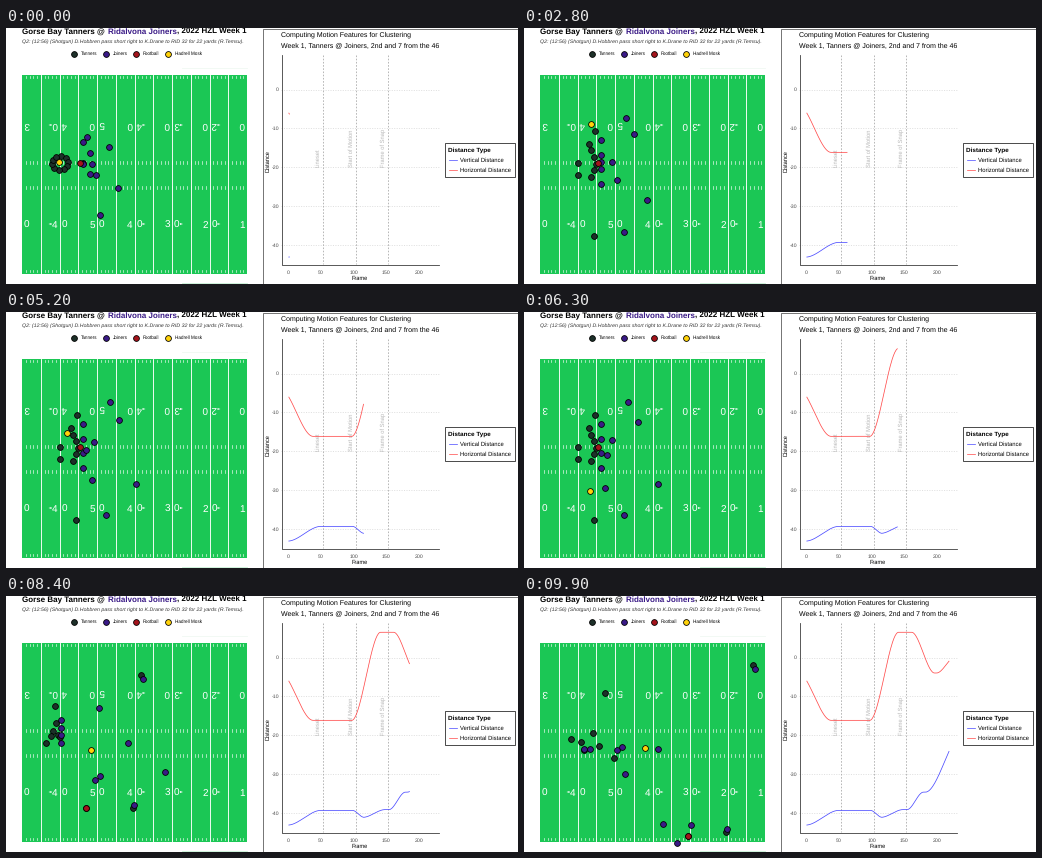
Write a matplotlib script that moves like this. It is 512x256 px and loops after 10000 ms.

```python
import matplotlib.pyplot as plt
import numpy as np
from matplotlib.animation import FuncAnimation
from matplotlib.patches import Polygon, Rectangle

W, H, DPI = 512, 256, 64
FRAMES, INTERVAL = 100, 100
PX = 72 / DPI  # points per pixel

GREEN, DARK, PURPLE = "#1bc755", "#1d3029", "#3a1a86"
BROWN, GOLD = "#a3141c", "#ffd20a"
BLUE, RED = "#4a4aff", "#ff4a4a"

plt.rcParams.update({
    "font.family": "Liberation Sans",
    "text.hinting": "none",
    "toolbar": "None",
})
fig = plt.figure(figsize=(W / DPI, H / DPI), dpi=DPI, facecolor="white")
ax = fig.add_axes([0, 0, 1, 1])
ax.set(xlim=(0, W), ylim=(H, 0))
ax.axis("off")


def text(x, y, s, size, color="black", ha="left", va="baseline", **kw):
    return ax.text(x, y, s, fontsize=size * PX, color=color, ha=ha, va=va, **kw)


def line(x, y, color="black", width=1.0, **kw):
    return ax.plot(x, y, color=color, lw=width * PX, **kw)[0]


def box(x, y, w, h, color):
    ax.add_patch(Rectangle((x, y), w, h, fc="white", ec=color, lw=0.8 * PX))


def dots(x, y, color, z=5):
    return ax.plot(x, y, "o", ms=5.8 * PX, mfc=color, mec="black",
                   mew=0.8 * PX, zorder=z)[0]


# ---- field ----
LEFT, RIGHT, TOP, BOTTOM = 16, 241, 47, 245.5
TEN = 37.5

text(16, 6.2, "Gorse Bay Tanners @", 8.03, weight="bold")
text(101.8, 6.2, "Ridalvona Joiners", 8.03, PURPLE, weight="bold")
text(171, 6.2, ", 2022 HZL Week 1", 8.03, weight="bold")
text(16, 15.2, "Q2: (12:56) (Shotgun) D.Hobbren pass short right to K.Drane "
     "to RID 32 for 22 yards (R.Temsu).", 5.3, "#333333", style="italic")

for x, label, color in ((67.5, "Tanners", DARK), (99.5, "Joiners", PURPLE),
                        (129.5, "Football", BROWN), (161.5, "Hadrell Mosk", GOLD)):
    dots([x], [25.5], color)
    text(x + 7.4, 27.2, label, 4.65)

field = Rectangle((LEFT, TOP), RIGHT - LEFT, BOTTOM - TOP, fc=GREEN, lw=0)
ax.add_patch(field)
for k in range(1, 12):
    line([LEFT + k * TEN / 2] * 2, [TOP, BOTTOM], "white", 0.9)
for k in range(1, 60):
    x = LEFT + k * TEN / 10
    for y in (48, 133.3, 158.3, 242):
        line([x, x], [y, y + 2.2], "white", 0.7, alpha=0.85)

for k in range(7):
    x, tens = LEFT + k * TEN, str(5 - abs(k - 2))
    for y, up, turn, pair in ((97, -1, 180, "0" + tens), (196, 1, 0, tens + "0")):
        for dx, digit in zip((-4.7, 4.7), pair):
            if LEFT < x + dx < RIGHT:
                text(x + dx, y + 3.5 * up, digit, 10, "white", "center",
                     rotation=turn, rotation_mode="anchor")
        if k != 2 and 0 < k < 6:
            side = np.sign(k - 2)
            tip = x + 11 * side
            ax.add_patch(Polygon([(tip - 3 * side, y - 1), (tip - 3 * side, y + 1),
                                  (tip, y)], fc="white", lw=0))
line([176, 241], [39.5, 39.5], "#eff8f2", 0.8)
line([176, 241], [254.5, 254.5], "#c4efd2", 0.8)


# ---- chart ----
def fx(f):
    return 282.2 + 0.655 * np.asarray(f, float)


def vy(v):
    return 61.5 - 3.88 * np.asarray(v, float)


box(256.5, 0.5, 255, 255, "#555555")
text(275, 8.3, "Computing Motion Features for Clustering", 7.06)
text(275, 20.3, "Week 1, Tanners @ Joiners, 2nd and 7 from the 46", 6.96)

for v in range(0, -50, -10):
    line([275, 432.5], [vy(v)] * 2, "#d4d4d4", 0.7, ls=(0, (1.5, 2)))
    text(273, vy(v) + 1.8, str(v), 5.2, "#4d4d4d", "right")
for f in range(0, 250, 50):
    text(fx(f), 245.6, str(f), 5.2, "#4d4d4d", "center")
for f, label in ((53, "Lineset"), (104, "Start of Motion"), (152, "Frame of Snap")):
    line([fx(f)] * 2, [27, 236], "#a6a6a6", 0.8, ls=(0, (2, 2)))
    text(fx(f) - 2, 139, label, 5.8, "#b8b8b8", "right", "bottom", rotation=90)
line([275.5, 275.5, 432.5], [27, 236.5, 236.5], "#333333", 0.8)
text(354, 251.6, "Frame", 5.6, ha="center")
text(261.8, 133, "Distance", 5.6, ha="center", va="center", rotation=90)

box(438.5, 114.5, 70, 34, "#222222")
text(442.5, 123.6, "Distance Type", 6.4, weight="bold")
for y, color, label in ((132, BLUE, "Vertical Distance"),
                        (142, RED, "Horizontal Distance")):
    line([443, 450.5], [y, y], color, 0.7)
    text(454.5, y + 2, label, 5.85)


# ---- motion ----
STEPS = np.arange(FRAMES)
SNAP, CATCH, LAST = 69, 84, FRAMES - 1


def ease(x, a, b):
    u = np.clip((np.asarray(x, float) - a) / (b - a), 0, 1)
    return u * u * (3 - 2 * u)


def cross(f):
    return (-3.8 - 12.4 * ease(f, -13, 38) + 22.7 * ease(f, 97, 141)
            - 10.5 * ease(f, 161, 196) + 4.2 * ease(f, 199, 228))


def depth(f):
    return (-43.2 + 3.8 * ease(f, -1, 50) - 1.8 * ease(f, 98, 116)
            + 2 * ease(f, 114, 148) + 4.5 * ease(f, 154, 179)
            + 15.5 * ease(f, 182, 240))


def path(times, points):
    """Monotone cubic through points, sampled at every step."""
    t, p = np.array(times, float), np.array(points, float)
    h = np.diff(t)[:, None]
    d = np.diff(p, axis=0) / h
    same = d[:-1] * d[1:] > 0
    inner = np.where(same, 2 * d[:-1] * d[1:] / np.where(same, d[:-1] + d[1:], 1), 0)
    m = np.vstack([d[:1], inner, d[-1:]])
    i = np.clip(np.searchsorted(t, STEPS, side="right") - 1, 0, len(t) - 2)
    u = ((np.clip(STEPS, t[0], t[-1]) - t[i]) / h[i, 0])[:, None]
    return ((1 + 2 * u) * (1 - u) ** 2 * p[i] + u * (1 - u) ** 2 * h[i] * m[i]
            + u * u * (3 - 2 * u) * p[i + 1] + u * u * (u - 1) * h[i] * m[i + 1])


def grid(x, y):
    return np.column_stack(np.broadcast_arrays(x, y)).astype(float)


# Offence: a huddle ring, a line that drops back at the snap, then a scatter.
i = np.arange(6)
turn = -1.4 + 2 * np.pi * np.arange(10) / 10
huddle = grid(54 + 8 * np.cos(turn), 135 + 6.8 * np.sin(turn))
front = grid(72 - 2.3 * abs(i - 3), 116 + 6.5 * i)
pocket = grid(48.5 - (-1.0) ** i * i, 142 - 32 * np.exp(-0.75 * i))
upfield = [(81, 97), (69, 137), (57, 146), (75, 150), (59.5, 154), (90, 161.5)]

# Low wideout, back, passer and high wideout at set, drop, catch and end.
skill = np.array([
    [(69.5, 208), (78, 208), (126.5, 212), (202, 236)],
    [(54, 147), (58, 156), (80, 212), (163.5, 240)],
    [(54, 135), (52, 136), (40, 147), (47, 143)],
    [(71, 102.5), (80, 102), (135, 79), (229, 69)]])
stages = [np.vstack(s) for s in zip((front, front + (-6, 1), pocket, upfield),
                                    skill.swapaxes(0, 1))]
offence = []
for start, ready, drop, catch, end in zip(huddle, *stages):
    arrive = 8 + 0.17 * np.hypot(*(ready - start))
    offence.append(path((0, arrive, SNAP, SNAP + 5, CATCH, LAST),
                        (start, ready, ready, drop, catch, end)))
low, back, passer, high = offence[6:]

# Rushers hold a column, then close on the pocket.
i = np.arange(4)
wall = grid(76.5, 112 + 14.5 * i)
rushers = [path((0, 28, SNAP, SNAP + 5, CATCH, LAST), p) for p in zip(
    grid(77 + 7 * (i % 2), 114 + 10.5 * i), wall, wall,
    grid(69 - 3 * abs(i - 2), 109 + 16 * i), grid(55, 124 + 7.7 * i),
    [(66, 153), (93, 154), (60, 153), (101, 178)])]

# Corners shadow the wideouts, and their cushion shrinks after the snap.
corners = [man + path((0, 14, SNAP, CATCH), gaps) for man, gaps in (
    (high, [(31, -20), (31, -13), (33, -13), (1.5, 4)]),
    (low, [(46, 47), (30, -4), (30, -5), (1, -3.5)]))]

# Coverage spreads out from a tighter shape, then runs to the catch.
safeties = [path((0, 28, SNAP + 5, CATCH, LAST),
                 [(20 + 0.75 * p[0][0], 53 + 0.62 * p[0][1])] + p) for p in (
    [(110, 106), (116, 113), (122, 147), (134, 153)],
    [(87.5, 134), (89, 124), (93, 112), (98, 151)],
    [(76.5, 134), (86, 149), (94, 180), (138.5, 228)],
    [(93, 152), (79, 182), (88.5, 184), (152.5, 247)],
    [(122.5, 172), (140, 172.5), (158.5, 176), (167, 229)])]

# The ball goes from its spot to the passer, then to the back.
snap = ease(STEPS, SNAP, SNAP + 5)[:, None]
throw = ease(STEPS, 76, 83)[:, None]
held = (1 - snap) * (73.5, 135) + snap * (passer - (3, 0))
ball = (1 - throw) * held + throw * back

# The motion man follows the two charted distances, one step behind.
lag = 1 + 217 * np.maximum(STEPS - 1, 0) / LAST
mover = grid(53 + 3.75 * (depth(lag) + 43.2), 134 + 3.75 * (cross(lag) + 6.1))

groups = [(np.array(t), dots([], [], c, z)) for t, c, z in (
    (offence, DARK, 5), (rushers + corners + safeties, PURPLE, 6),
    ([ball], BROWN, 7), ([mover], GOLD, 8))]
curves = [(cross, line([], [], RED, 0.75, zorder=4)),
          (depth, line([], [], BLUE, 0.75, zorder=4))]


def draw(n):
    for paths, art in groups:
        art.set_data(paths[:, n, 0], paths[:, n, 1])
    end = 1 + max(217 * n / LAST, 0.8)
    f = np.linspace(1, end, 2 + int(end))
    for curve, art in curves:
        art.set_data(fx(f), vy(curve(f)))
    return [art for _, art in groups + curves]


anim = FuncAnimation(fig, draw, frames=FRAMES, interval=INTERVAL,
                     repeat=True, repeat_delay=0)
plt.show()
```
